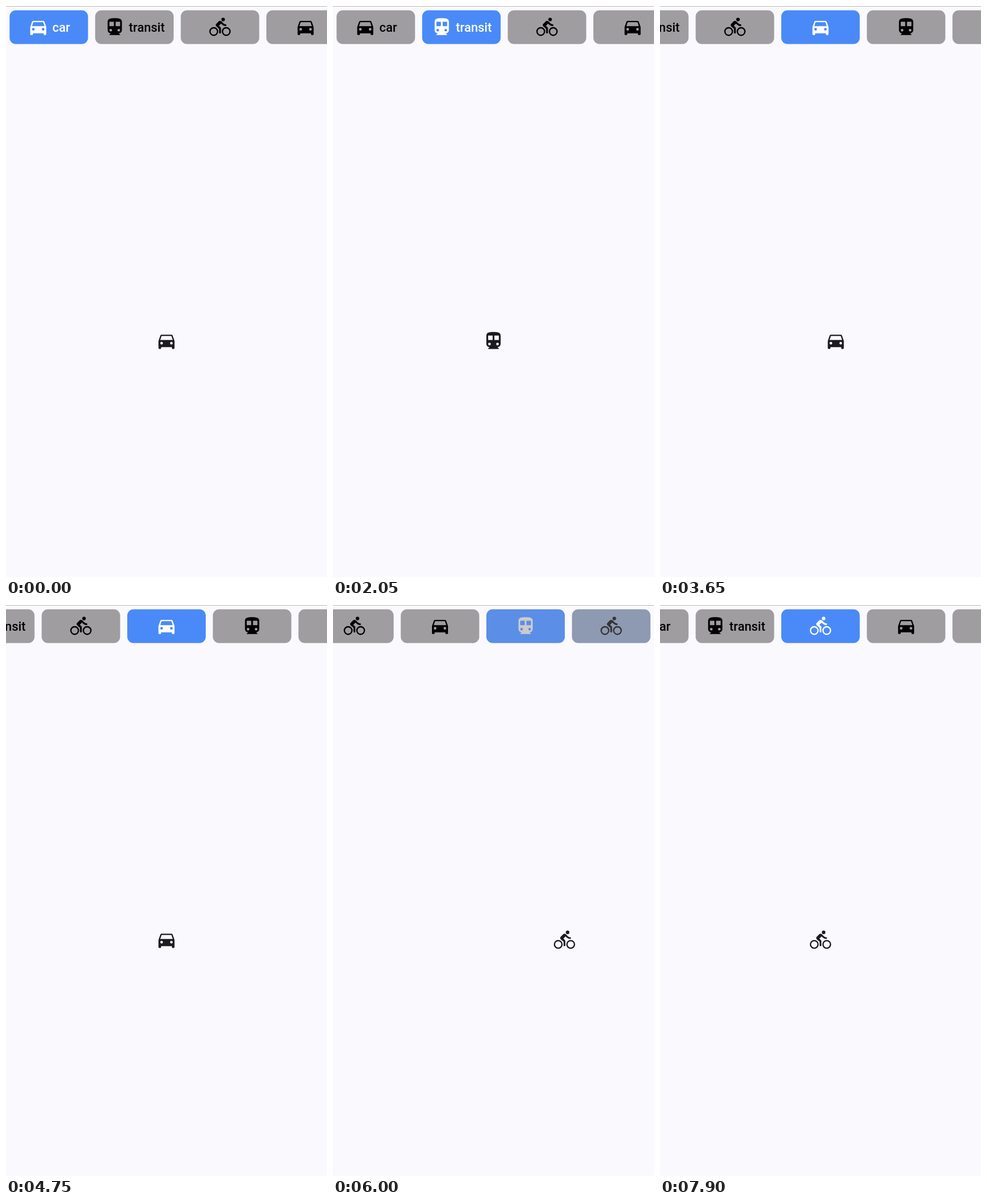
These frames come from a looping animation (561x998 px, 8000 ms). An HTML page with a canvas:

```html
<!DOCTYPE html>
<html lang="en">
<head>
<meta charset="utf-8">
<title>Transport tabs</title>
<style>
  html, body { margin: 0; width: 100%; height: 100%; overflow: hidden; background: #faf9fd; }
  canvas { display: block; }
</style>
</head>
<body>
<canvas id="stage" width="561" height="998"></canvas>
<script>
const ctx = document.getElementById('stage').getContext('2d');
const W = 561, H = 998, LOOP = 8000;
const UNIT = W / 360;
const ICON = 24 * UNIT;
const PITCH = 149.6, MARGIN = 4 * UNIT, TAB_Y = 7.5, TAB_H = 59;
const TAB_MS = 250, JUMP_MS = 300, JUMP_AT = 7340;
const GREY = [159, 157, 160], BLUE = [74, 138, 248];
const BLACK = [0, 0, 0], WHITE = [255, 255, 255], INK = [29, 27, 32];

// Icons live on a 24-unit grid: an outline plus circles, filled even-odd.
function makeIcon(outline, circles) {
  const path = new Path2D(outline);
  for (const [x, y, r] of circles) {
    path.moveTo(x + r, y);
    path.arc(x, y, r, 0, Math.PI * 2);
  }
  return path;
}

const car = makeIcon(
  'M18.92 6C18.72 5.42 18.16 5 17.5 5h-11c-.66 0-1.21.42-1.42 1L3 12v8c0 .55.45 1 1 1h1' +
  'c.55 0 1-.45 1-1v-1h12v1c0 .55.45 1 1 1h1c.55 0 1-.45 1-1v-8zM5 11l1.5-4.5h11L19 11z',
  [[6.5, 14.5, 1.5], [17.5, 14.5, 1.5]]);
const train = makeIcon(
  'M12 2c-4.42 0-8 .5-8 4v9.5C4 17.43 5.57 19 7.5 19L6 20.5v.5h12v-.5L16.5 19' +
  'c1.93 0 3.5-1.57 3.5-3.5V6c0-3.5-3.58-4-8-4zM6 6h5v5H6zM13 6h5v5h-5z',
  [[7.5, 15.5, 1.5], [16.5, 15.5, 1.5]]);
const bike = makeIcon(
  'M10.8 10.5l2.4-2.4.8.8c1.3 1.3 3 2.1 5.1 2.1V9c-1.5 0-2.7-.6-3.6-1.5l-1.9-1.9' +
  'c-.5-.4-1-.6-1.6-.6s-1.1.2-1.4.6L7.8 8.4c-.4.4-.6.9-.6 1.4 0 .6.2 1.1.6 1.4L11 14v5h2v-6.2z',
  [[15.5, 3.5, 2], [5, 17, 5], [5, 17, 3.5], [19, 17, 5], [19, 17, 3.5]]);

const tabs = [
  { icon: car, label: 'car' }, { icon: train, label: 'transit' }, { icon: bike },
  { icon: car }, { icon: train }, { icon: bike }
];

// Each swipe drags the page to `reach`, then a spring finishes the move.
const swipes = [
  { at: 1190, drag: 200, reach: 0.5, power: 2 },
  { at: 2350, drag: 200, reach: 0.5, power: 2 },
  { at: 3200, drag: 200, reach: 0.5, power: 2 },
  { at: 5095, drag: 200, reach: 0.5, power: 2 },
  { at: 5900, drag: 68, reach: 0.577, power: 1 }
];
const selections = [
  { at: 0, from: 0, to: 0 }, { at: 1385, from: 0, to: 1 }, { at: 2540, from: 1, to: 2 },
  { at: 3390, from: 2, to: 3 }, { at: 5285, from: 3, to: 4 }, { at: 5950, from: 4, to: 5 },
  { at: JUMP_AT, from: 5, to: 2 }
];

const clamp = (v, lo = 0, hi = 1) => Math.min(hi, Math.max(lo, v));
const lerp = (a, b, f) => a + (b - a) * f;
const mix = (a, b, f) => `rgb(${a.map((v, i) => Math.round(lerp(v, b[i], f))).join(',')})`;

// cubic-bezier(.25, .1, .25, 1)
function ease(x) {
  if (x <= 0 || x >= 1) return clamp(x);
  const curve = (a, b, s) => 3 * a * s * (1 - s) ** 2 + 3 * b * s * s * (1 - s) + s ** 3;
  let lo = 0, hi = 1;
  for (let i = 0; i < 20; i++) {
    const mid = (lo + hi) / 2;
    if (curve(0.25, 0.25, mid) < x) lo = mid; else hi = mid;
  }
  return curve(0.1, 1, lo);
}

function swipeProgress({ at, drag, reach, power }, t) {
  const age = t - at;
  if (age <= 0) return 0;
  if (age < drag) return reach * (age / drag) ** power;
  if (age > 820) return 1;
  // Overdamped spring: stiffness 100, mass 0.5, damping ratio 1.1.
  const slow = 9.08, fast = 22.04;
  const rest = 1 - reach, speed = power * reach / (drag / 1000);
  const a = (fast * rest - speed) / (fast - slow);
  const s = (age - drag) / 1000;
  return 1 - a * Math.exp(-slow * s) - (rest - a) * Math.exp(-fast * s);
}

function drawIcon(icon, cx, cy, color) {
  ctx.save();
  ctx.translate(cx - ICON / 2, cy - ICON / 2);
  ctx.scale(UNIT, UNIT);
  ctx.fillStyle = color;
  ctx.fill(icon, 'evenodd');
  ctx.restore();
}

function drawPages(t) {
  const show = (icon, offset) => {
    if (Math.abs(offset) < 0.6) drawIcon(icon, W / 2 + offset * W, 585.4, mix(INK, INK, 0));
  };
  if (t >= JUMP_AT) {
    const p = ease((t - JUMP_AT) / JUMP_MS);
    show(tabs[5].icon, p);
    show(tabs[2].icon, p - 1);
    return;
  }
  const page = swipes.reduce((sum, swipe) => sum + swipeProgress(swipe, t), 0);
  tabs.forEach((tab, i) => show(tab.icon, i - page));
}

// Overscroll glow at the right edge: quick pull, then a decelerating retreat.
function drawGlow(t) {
  const pull = 1 - (1 - clamp((t - 6560) / 130)) ** 2;
  const recede = (1 - clamp((t - 6705) / 600)) ** 2;
  const size = pull * recede;
  if (size <= 0) return;
  ctx.save();
  ctx.beginPath();
  ctx.rect(0, 73, W, H - 73);
  ctx.clip();
  ctx.translate(W, 674);
  ctx.scale(size, 1);
  ctx.beginPath();
  ctx.ellipse(403, 0, 486, 1387.5, 0, 0, Math.PI * 2);
  ctx.fillStyle = `rgba(33,150,243,${0.1 * size})`;
  ctx.fill();
  ctx.restore();
}

function drawTab(tab, x, active) {
  const width = PITCH - 2 * MARGIN, cx = x + width / 2, cy = TAB_Y + TAB_H / 2;
  ctx.fillStyle = mix(GREY, BLUE, active);
  ctx.beginPath();
  ctx.roundRect(x, TAB_Y, width, TAB_H, 7 * UNIT);
  ctx.fill();

  const color = mix(BLACK, WHITE, active);
  if (!tab.label) {
    drawIcon(tab.icon, cx, cy - 0.2, color);
    return;
  }
  const gap = 6;
  const left = cx - (ICON + gap + ctx.measureText(tab.label).width) / 2;
  drawIcon(tab.icon, left + ICON / 2, cy - 0.2, color);
  ctx.fillStyle = color;
  ctx.fillText(tab.label, left + ICON + gap, 45);
}

function drawTabs(t) {
  const { at, from, to } = selections.filter(s => s.at <= t).pop();
  const f = clamp((t - at) / TAB_MS);
  const target = i => clamp((i + 0.5) * PITCH - W / 2, 0, tabs.length * PITCH - W);
  const scroll = lerp(target(from), target(to), ease(f));
  ctx.font = `500 ${14 * UNIT}px Roboto, sans-serif`;
  tabs.forEach((tab, i) => {
    const active = i === to ? (from === to ? 1 : f) : i === from ? 1 - f : 0;
    drawTab(tab, i * PITCH + MARGIN - scroll, active);
  });
}

function frame() {
  const t = performance.now() % LOOP;
  ctx.fillStyle = '#faf9fd';
  ctx.fillRect(0, 0, W, H);
  ctx.fillStyle = '#b9b7bc';
  ctx.fillRect(0, 0, W, 1);
  drawPages(t);
  drawGlow(t);
  drawTabs(t);
  requestAnimationFrame(frame);
}
frame();
</script>
</body>
</html>
```
